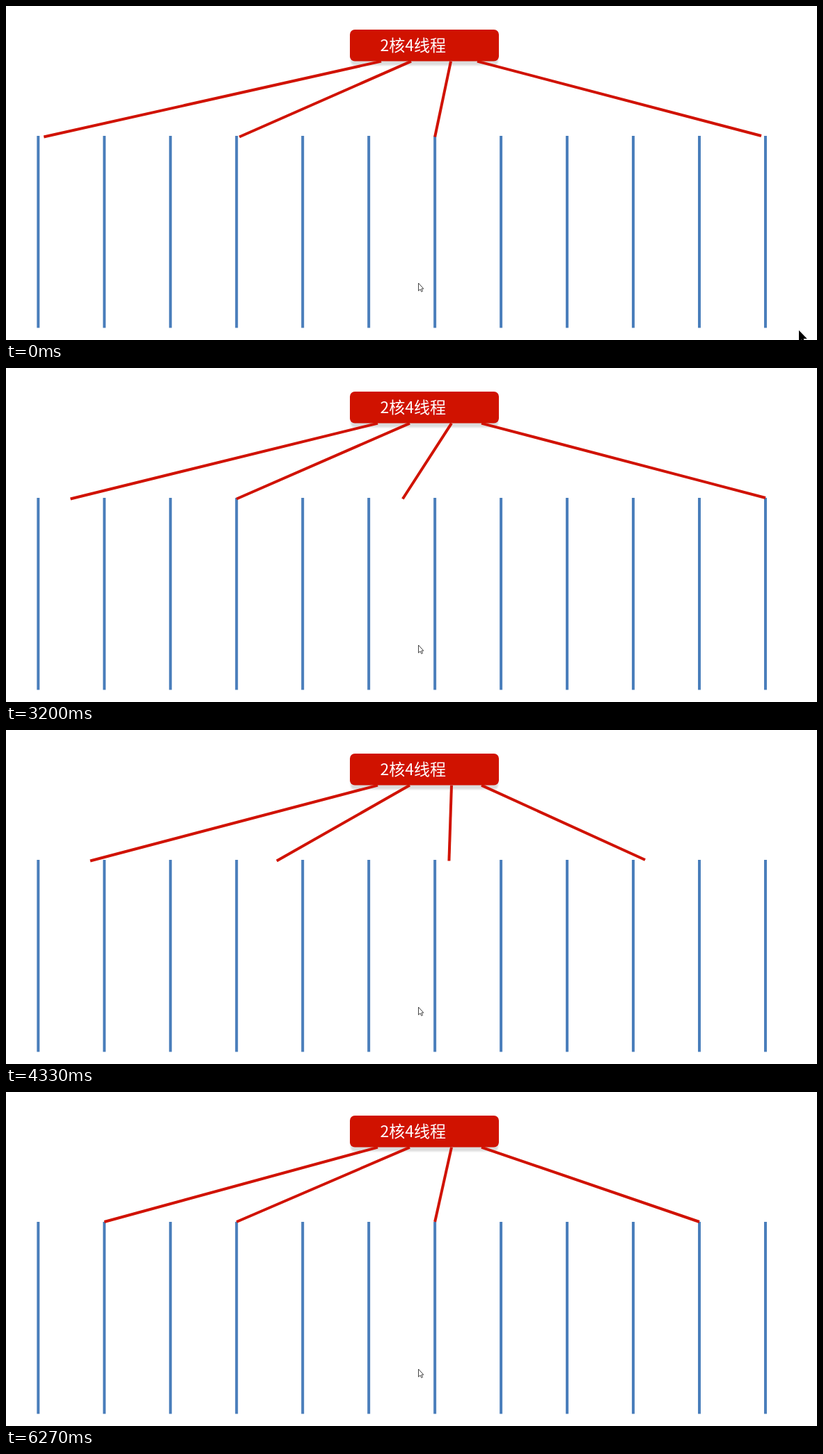
An HTML page that plays this animation: 1165x481 px, repeating every 9870 ms.

```html
<!DOCTYPE html>
<html lang="zh">
<head>
<meta charset="utf-8">
<title>2核4线程</title>
<style>
  html, body { margin: 0; width: 100%; height: 100%; overflow: hidden; background: #fff; }
  svg { display: block; width: 1165px; height: 481px; }
  text { font: 23px "Noto Sans CJK SC", "Noto Sans CJK", sans-serif; fill: #fff; }
</style>
</head>
<body>
<svg viewBox="0 0 1165 481">
  <defs>
    <filter id="soft" x="-5%" y="-20%" width="110%" height="140%"><feGaussianBlur stdDeviation=".8"/></filter>
  </defs>
  <rect x="495" y="41" width="212" height="44.5" rx="6" fill="#dcdcdc" filter="url(#soft)"/>
  <g id="bars" stroke="#4a7ebb" stroke-width="4"></g>
  <g id="links" stroke="#d01200" stroke-width="4"></g>
  <rect x="494" y="34" width="214" height="45.5" rx="7" fill="#d01200"/>
  <text x="537.5" y="64.5">2核4线程</text>
  <path d="M592.5 399v11.2l2.5-2.3 1.8 3.6 1.7-.8-1.7-3.5h3z" fill="#fff" stroke="#444"/>
  <path id="pointer" d="M0 0v17l4-3.7 2.6 6 2.6-1.1-2.6-5.9h5.2z"/>
</svg>
<script>
const LOOP = 9870, TICK = 200 / 3;
const BEGIN = 3010, HOP = 390;

// Each core link visits one bar per stop; a repeated bar is a rest.
const LINKS = [
  { top: [539, 534], nudge: 8, stops: [0, 1, 2, 0, 2, 2, 2, 1] },
  { top: [582, 580], nudge: 4, stops: [3, 3, 4, 4, 3, 4, 4, 3] },
  { top: [639, 640], nudge: 0, stops: [6, 5, 7, 7, 5, 7, 7, 6] },
  { top: [677, 683], nudge: -6, stops: [11, 11, 9, 8, 11, 9, 9, 10] }
];

const clamp = u => Math.min(1, Math.max(0, u));
const smooth = u => u * u * (3 - 2 * u);
const lerp = (a, b, u) => a + (b - a) * u;
const barX = i => 46.3 + i * 94.97;

const bars = document.getElementById("bars");
const group = document.getElementById("links");
const pointer = document.getElementById("pointer");

function setLine(line, x1, y1, x2, y2) {
  Object.entries({ x1, y1, x2, y2 }).forEach(([key, value]) => line.setAttribute(key, value));
}

function addLine(parent) {
  return parent.appendChild(document.createElementNS("http://www.w3.org/2000/svg", "line"));
}

for (let i = 0; i < 12; i++) setLine(addLine(bars), barX(i), 187, barX(i), 463.5);
for (const link of LINKS) link.line = addLine(group);

function drawLink({ line, top, nudge, stops }, t) {
  const last = stops.length - 1;
  const pos = Math.min(last, Math.max(0, (t - BEGIN) / HOP));
  const from = Math.min(last - 1, Math.floor(pos));
  const column = lerp(stops[from], stops[from + 1], pos - from);
  const moved = pos > 0;
  const low = nudge < 0 || pos === last ? 187 : 188.5;
  setLine(line, top[+moved], 79.6, barX(column) + (moved ? 0 : nudge), low);
}

function drawPointer(t) {
  const arrive = smooth(clamp(t / 800));
  const leave = smooth(clamp((t - 1267) / 263));
  const x = lerp(1139, 331, arrive) + 116 * leave;
  const y = lerp(467, 301, arrive) + 189 * leave;
  pointer.setAttribute("transform", `translate(${x} ${y})`);
}

function draw(time) {
  const t = Math.floor((time % LOOP + 5) / TICK) * TICK;
  LINKS.forEach(link => drawLink(link, t));
  drawPointer(t);
}

const start = performance.now();
function run() {
  draw(performance.now() - start);
  requestAnimationFrame(run);
}
run();
</script>
</body>
</html>
```
